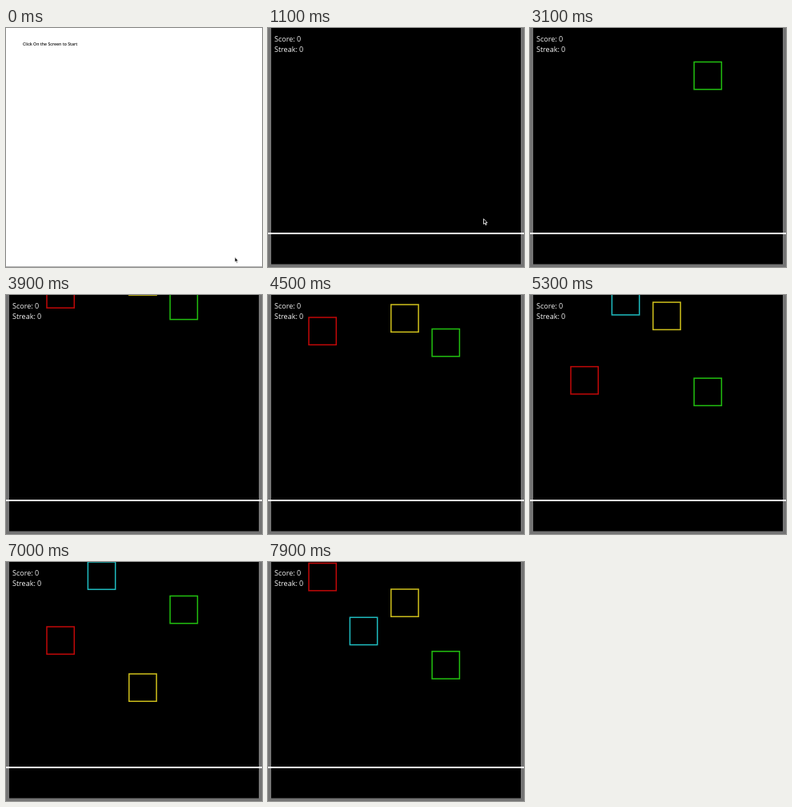
An HTML page that plays this animation: 320x299 px, repeating every 8 s.

```html
<!DOCTYPE html>
<html lang="en">
<head>
<meta charset="utf-8">
<title>Falling squares</title>
<style>
  html, body { margin: 0; width: 100%; height: 100%; overflow: hidden; background: #fff; }
  svg { display: block; width: 320px; height: 299px; }
  text { font-family: "Open Sans", "Noto Sans", sans-serif; }
</style>
</head>
<body>
<svg viewBox="0 0 320 299">
  <g id="intro">
    <rect width="320" height="299" fill="#fff"/>
    <rect y="298" width="320" height="1" fill="#b4b4b4"/>
    <text x="21" y="21.7" font-size="5.2" font-weight="600" fill="#111">Click On the Screen to Start</text>
  </g>
  <g id="game">
    <rect width="320" height="299" fill="#747474"/>
    <rect x="4" width="312" height="295.5" fill="#000"/>
    <g id="notes" fill="none" stroke-width="1.5"></g>
    <rect y="256" width="320" height="2" fill="#fff"/>
    <g font-size="9" fill="#f4f4f4">
      <text x="8" y="17">Score: 0</text>
      <text x="8" y="30">Streak: 0</text>
    </g>
  </g>
  <path id="cursor" d="M0 0V6.6L1.5 5.3L2.6 7.8L3.7 7.3L2.6 4.9H4.6Z" fill="#000" stroke="#fff" stroke-width=".8"/>
</svg>
<script>
const LOOP = 8000, STEP = 100, START = 1100;
const SPEED = 0.077;  // px per ms
const SIZE = 34.3;

// top: times at which each square of the lane reaches y = 0
const lanes = [
  { x: 51, color: '#c20808', top: [4136, 5948, 7880] },
  { x: 102.4, color: '#1fbcc0', top: [5422, 7000] },
  { x: 153.8, color: '#cfc01c', top: [4344, 5182, 7458] },
  { x: 205.1, color: '#22c010', top: [2548, 3948, 6448] }
];

// [from time, x, y]; no position means hidden
const pointer = [
  [0, 286, 286.5], [100], [500, 290.5, 246], [600, 277, 242],
  [700, 266.5, 240], [800, 269.5, 238.7], [1200]
];

const byId = id => document.getElementById(id);
const show = (el, on) => el.setAttribute('visibility', on ? 'visible' : 'hidden');
const fall = (t, top) => (t - top) * SPEED;

const notes = lanes.flatMap(({ x, color, top }) => top.map((time, i) => {
  const el = document.createElementNS('http://www.w3.org/2000/svg', 'rect');
  const attrs = { x, width: SIZE, height: SIZE, stroke: color };
  for (const name in attrs) el.setAttribute(name, attrs[name]);
  byId('notes').append(el);
  return { el, time, next: top[i + 1] ?? Infinity };
}));

function draw(t) {
  const playing = t >= START;
  show(byId('intro'), !playing);
  show(byId('game'), playing);

  for (const { el, time, next } of notes) {
    const y = fall(t, time);
    // a square goes once its successor is halfway in
    const on = playing && y > -SIZE - 1 && fall(t, next) < -SIZE / 2;
    show(el, on);
    if (on) el.setAttribute('y', y.toFixed(2));
  }

  const [, x, y] = pointer.findLast(p => p[0] <= t);
  show(byId('cursor'), x !== undefined);
  if (x !== undefined) byId('cursor').setAttribute('transform', `translate(${x} ${y})`);
}

const begin = performance.now();
function tick() {
  const t = (performance.now() - begin) % LOOP;
  draw(Math.floor(t / STEP) * STEP);
  requestAnimationFrame(tick);
}
tick();
</script>
</body>
</html>
```
